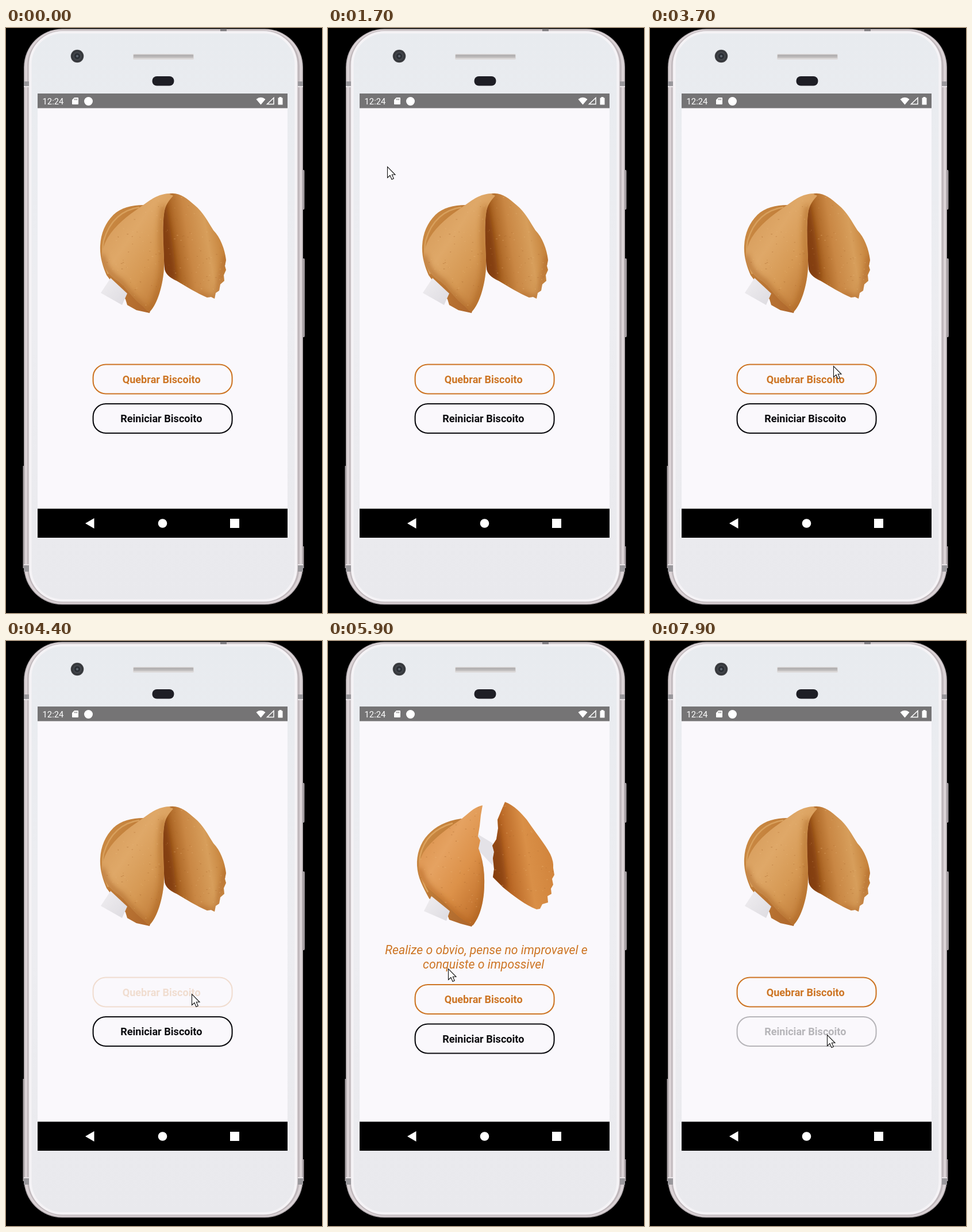
Write an HTML page that moves like this. It is 550 px wide and 1018 px high and loops after 8 s.

```html
<!DOCTYPE html>
<html lang="pt">
<head>
<meta charset="utf-8">
<title>Biscoito da sorte</title>
<style>
  html, body { margin: 0; width: 100%; height: 100%; overflow: hidden; background: #000; }
  svg { display: block; width: 550px; height: 1018px; font-family: Roboto, "Liberation Sans", sans-serif; }
</style>
</head>
<body>
<svg viewBox="0 0 550 1018" xmlns="http://www.w3.org/2000/svg">
  <defs>
    <linearGradient id="face" x2="0" y2="1">
      <stop offset="0" stop-color="#e8ebef"/><stop offset=".5" stop-color="#ededf1"/><stop offset="1" stop-color="#e9e9ed"/>
    </linearGradient>
    <linearGradient id="speaker" x2="0" y2="1">
      <stop offset="0" stop-color="#a9a7a8"/><stop offset="1" stop-color="#c9c6c6"/>
    </linearGradient>
    <radialGradient id="lens">
      <stop offset="0" stop-color="#77808a"/><stop offset=".3" stop-color="#20242a"/>
      <stop offset=".55" stop-color="#46494e"/><stop offset=".8" stop-color="#303337"/><stop offset="1" stop-color="#4b4b4e"/>
    </radialGradient>
    <linearGradient id="crust" x1=".1" y1=".1" x2=".85" y2=".95">
      <stop offset="0" stop-color="#d59a59"/><stop offset=".35" stop-color="#dfa868"/>
      <stop offset=".65" stop-color="#d69954"/><stop offset="1" stop-color="#bd7734"/>
    </linearGradient>
    <linearGradient id="hollow" x1="0" y1=".65" x2=".95" y2=".4">
      <stop offset="0" stop-color="#8b4616"/><stop offset=".2" stop-color="#a7601f"/>
      <stop offset=".45" stop-color="#c98744"/><stop offset=".75" stop-color="#d79e5b"/><stop offset="1" stop-color="#c58139"/>
    </linearGradient>
    <linearGradient id="warmCrust" x1=".1" y1=".1" x2=".85" y2=".95">
      <stop offset="0" stop-color="#d98f4a"/><stop offset=".35" stop-color="#e5a261"/>
      <stop offset=".65" stop-color="#dc9149"/><stop offset="1" stop-color="#c0702c"/>
    </linearGradient>
    <linearGradient id="shard" x1="0" y1=".65" x2=".95" y2=".4">
      <stop offset="0" stop-color="#8c410d"/><stop offset=".25" stop-color="#b86624"/>
      <stop offset=".6" stop-color="#d98f47"/><stop offset="1" stop-color="#d1843c"/>
    </linearGradient>
    <linearGradient id="fold" x2="1" y2="1">
      <stop offset="0" stop-color="#cf9049"/><stop offset=".45" stop-color="#be7a36"/><stop offset="1" stop-color="#ad652b"/>
    </linearGradient>
    <linearGradient id="paper" x2="1" y2="1">
      <stop offset="0" stop-color="#f0eef1"/><stop offset="1" stop-color="#dddbe0"/>
    </linearGradient>
    <filter id="soft" x="-60%" y="-30%" width="220%" height="160%"><feGaussianBlur stdDeviation="5"/></filter>
    <path id="wholeLeft" d="M284 288C262 289 249 301 233 312C213 326 190 343 177 365C168 381 166 393 168 407C172 422 184 434 197 442C209 452 218 467 232 479C241 486 246 494 250 494C263 481 273 450 275 418C276 389 271 357 275 324C277 307 284 300 291 292Z"/>
    <path id="wholeRight" d="M281 289C300 284 314 296 328 308C343 320 352 338 361 352C373 364 381 385 383 404L381 414L383 421L379 430L380 440L373 446L371 457L365 461L363 471L357 468L350 469C333 462 312 449 297 440Q277 431 276 418C274 393 272 356 274 329C276 311 279 301 286 293Z"/>
    <path id="brokenLeft" d="M269 286C253 289 244 301 229 312C207 327 181 345 166 368C157 385 157 400 161 411C167 425 181 436 193 446C209 459 219 475 235 485Q244 491 252 495C266 479 272 449 272 424Q273 397 266 372L262 361L265 347L261 340L264 322L266 303Z"/>
    <path id="brokenRight" d="M308 280C324 286 336 299 346 311C360 332 377 352 387 371Q393 384 392 395L394 407L390 414L392 424L388 431L389 440L382 444L383 455L373 458L369 466L363 467C343 459 322 443 305 429L287 411L289 397L287 378L289 367L286 356L293 345L296 326L295 311L302 294Z"/>
    <clipPath id="clipWholeLeft"><use href="#wholeLeft"/></clipPath>
    <clipPath id="clipWholeRight"><use href="#wholeRight"/></clipPath>
    <clipPath id="clipBrokenLeft"><use href="#brokenLeft"/></clipPath>
    <clipPath id="clipBrokenRight"><use href="#brokenRight"/></clipPath>
  </defs>

  <rect width="550" height="1018"/>

  <g id="phone">
    <path d="M515 247h3.500q1 0 1 3v63q0 3-1 3H515zM515 401h4q1 0 1 3v131q0 3-1 3h-4z" fill="#a49da1"/>
    <path d="M30.500 762V940M517.500 902V940" stroke="#a9a1a5" stroke-width="2"/>
    <rect x="31" y="1.500" width="486" height="1002" rx="67" fill="#aaa3a7"/>
    <rect x="32.500" y="2.500" width="483" height="999.500" rx="65" fill="#dbd3d6"/>
    <rect x="37" y="4" width="474" height="996" rx="62" fill="#c0b8bc"/>
    <rect x="39.500" y="5" width="468" height="993.500" rx="60" fill="#e6e1e4"/>
    <path d="M31 93h9v8h-9zM508 93h9v8h-9zM31 935h9v11h-9zM508 935h9v11h-9z" fill="#99979b"/>
    <path d="M31 102h9M508 102h9M31 934h9M508 934h9" stroke="#e9e4e7" stroke-width="2"/>
    <path d="M373 1.500h11v5h-11z" fill="#7d7a7e"/>
    <rect x="42.500" y="7.500" width="462" height="988.500" rx="56" fill="url(#face)" stroke="#f5f3f6" stroke-width="4"/>
    <circle cx="124" cy="49" r="11.300" fill="url(#lens)"/>
    <rect x="221" y="45" width="106" height="10" rx="2" fill="#dddada"/>
    <rect x="222" y="46.500" width="104" height="6" rx="1" fill="url(#speaker)"/>
    <rect x="254.500" y="84" width="38" height="16.500" rx="8" fill="#1e1e25"/>
  </g>

  <rect x="55" y="114" width="435" height="773" fill="#faf8fc"/>
  <rect x="55" y="114" width="435" height="25.500" fill="#757475"/>
  <g id="status" fill="#fff">
    <text x="63.500" y="133" font-size="14.800">12:24</text>
    <path d="M119 121h6q1 0 1 1v10q0 1-1 1h-9q-1 0-1-1v-7z"/>
    <path d="M119.500 123v2.500M121.500 123v2.500M123.500 123v2.500" stroke="#757475"/>
    <circle cx="143.500" cy="127.500" r="7.500"/>
    <path d="M435.500 124Q443.500 117.500 451.500 124L443.500 133.500Z"/>
    <path d="M454.500 132.500H466V121.500Z" fill="none" stroke="#fff" stroke-width="1.500"/>
    <path d="M475.500 120h4v1.500h2v12h-8v-12h2z"/>
  </g>
  <rect x="55" y="836.500" width="435" height="50.500"/>
  <path d="M138 862L153.500 853V871ZM390 854h16v16h-16z" fill="#fff"/>
  <circle cx="272.500" cy="862" r="7.800" fill="#fff"/>

  <g id="whole">
    <path d="M240 308C218 308 200 313 187 325C173 339 165 357 164 379C163 397 168 414 175 430L184 442L208 472L211 482L227 491L250 496L252 487L238 470L190 385L260 340Z" fill="url(#fold)"/>
    <path d="M232 312C203 316 180 335 170 370Q164 398 178 428" fill="none" stroke="#d8a05d" stroke-width="2.500"/>
    <use href="#wholeRight" fill="url(#hollow)"/>
    <g clip-path="url(#clipWholeRight)">
      <path d="M276 298Q288 345 297 440L268 432V310Z" fill="#7c390d" opacity=".7" filter="url(#soft)"/>
      <path d="M383 395L365 471L335 463" fill="none" stroke="#a85e22" stroke-width="9" opacity=".5" filter="url(#soft)"/>
      <g class="pits"></g>
    </g>
    <use href="#wholeLeft" fill="url(#crust)"/>
    <g clip-path="url(#clipWholeLeft)">
      <path d="M275 310Q267 350 272 400Q274 450 250 494" fill="none" stroke="#a7601f" stroke-width="9" opacity=".55" filter="url(#soft)"/>
      <path d="M166 395Q174 427 200 442Q220 470 248 494" fill="none" stroke="#a96428" stroke-width="10" opacity=".6" filter="url(#soft)"/>
      <g class="pits"></g>
    </g>
    <path d="M182 435L211 462L202 482L165 461Z" fill="url(#paper)"/>
  </g>

  <g id="broken">
    <path d="M262 337L290 354L287 391L258 360Z" fill="#e4e2e7"/>
    <path d="M232 309C205 313 187 323 174 337C160 352 154 372 155 391C156 412 165 427 176 448L208 477L211 485L231 492L250 497L256 486L236 468L184 386L252 340Z" fill="url(#fold)"/>
    <path d="M217 317C187 326 167 343 160 375Q157 408 174 437" fill="none" stroke="#dda35d" stroke-width="2.500"/>
    <use href="#brokenLeft" fill="url(#warmCrust)"/>
    <g clip-path="url(#clipBrokenLeft)">
      <path d="M158 395Q168 428 194 446Q218 474 250 496" fill="none" stroke="#b0611f" stroke-width="10" opacity=".6" filter="url(#soft)"/>
      <path d="M272 380Q278 450 252 495" fill="none" stroke="#a7601f" stroke-width="9" opacity=".5" filter="url(#soft)"/>
      <g class="pits"></g>
    </g>
    <use href="#brokenRight" fill="url(#shard)"/>
    <g clip-path="url(#clipBrokenRight)">
      <path d="M294 300Q304 350 312 434L280 420Z" fill="#7c390d" opacity=".5" filter="url(#soft)"/>
      <g class="pits"></g>
    </g>
    <path d="M180 444L212 470L206 487L167 470Z" fill="url(#paper)"/>
    <g fill="#cd7524" font-size="21.270" font-style="italic" text-anchor="middle">
      <text x="275.500" y="545">Realize o obvio, pense no improvavel e</text>
      <text x="270.700" y="570">conquiste o impossivel</text>
    </g>
  </g>

  <g id="buttons" font-size="18.100" font-weight="700" text-anchor="middle">
    <g id="breakButton" fill="#cd7524" stroke="#cd7524">
      <rect x="151.600" y="585.500" width="242" height="51" rx="22" fill="none" stroke-width="2.100"/>
      <text x="270.700" y="617.500" stroke="none">Quebrar Biscoito</text>
    </g>
    <g id="resetButton" fill="#0b0b0f" stroke="#0b0b0f">
      <rect x="151.600" y="654" width="242" height="51" rx="22" fill="none" stroke-width="2.100"/>
      <text x="270.300" y="686.300" stroke="none">Reiniciar Biscoito</text>
    </g>
  </g>

  <path id="cursor" d="M.5 .5V19.500L5 15.500L8 22.500L11.300 21L8.300 14.300H14Z" fill="#fff" stroke="#111" stroke-width="1.100"/>
</svg>
<script>
const LOOP = 8000, STEP = 100;
const el = id => document.getElementById(id);

// Each row is time, x, y of the pointer tip.
const pointer = [
  [1500, 60, 237], [1700, 103, 241], [1800, 144, 245], [2000, 146, 245],
  [2100, 146, 245], [2500, 292, 385], [2600, 292, 385], [3000, 303, 451],
  [3500, 318, 578], [4200, 323, 614], [5100, 323, 614], [5900, 209, 570],
  [6100, 207, 571], [6900, 305, 680], [7200, 308, 685]
];
const breakFade = [[4300, 1], [4400, .2], [4500, .28], [4800, 1]];
const resetFade = [[7600, 1], [7700, .3], [7800, .2], [7900, .28]];

function sample(keys, t) {
  const next = keys.findIndex(k => k[0] > t);
  if (next === 0) return keys[0].slice(1);
  if (next < 0) return keys[keys.length - 1].slice(1);
  const a = keys[next - 1], b = keys[next];
  const u = (t - a[0]) / (b[0] - a[0]);
  return a.slice(1).map((v, i) => v + (b[i + 1] - v) * u);
}

// Small pits and light grains in the baked crust.
function addPits(group, seed) {
  const random = () => (seed = seed * 16807 % 2147483647) / 2147483647;
  let markup = "";
  for (let i = 0; i < 230; i++) {
    const x = 155 + random() * 240, y = 285 + random() * 210;
    const color = random() < .55 ? "#a7642a" : "#ebbc7f";
    markup += `<ellipse cx="${x.toFixed(1)}" cy="${y.toFixed(1)}" rx="${(.5 + random() * 1.3).toFixed(1)}" ry=".7" fill="${color}" opacity=".38"/>`;
  }
  group.innerHTML = markup;
}
document.querySelectorAll(".pits").forEach((group, i) => addPits(group, 71 + i * 530));

function draw(time) {
  const t = Math.floor(time % LOOP / STEP) * STEP;
  const isBroken = t >= 4500 && t < 7900;
  el("whole").style.display = isBroken ? "none" : "";
  el("broken").style.display = isBroken ? "" : "none";
  el("buttons").setAttribute("transform", `translate(0 ${isBroken ? 12.5 : 0})`);
  el("breakButton").setAttribute("opacity", sample(breakFade, t)[0]);
  el("resetButton").setAttribute("opacity", sample(resetFade, t)[0]);
  const [x, y] = sample(pointer, t).map(Math.round);
  el("cursor").style.display = t < pointer[0][0] ? "none" : "";
  el("cursor").setAttribute("transform", `translate(${x} ${y})`);
}

const start = performance.now();
function tick() {
  draw(performance.now() - start);
  requestAnimationFrame(tick);
}
tick();
</script>
</body>
</html>
```
